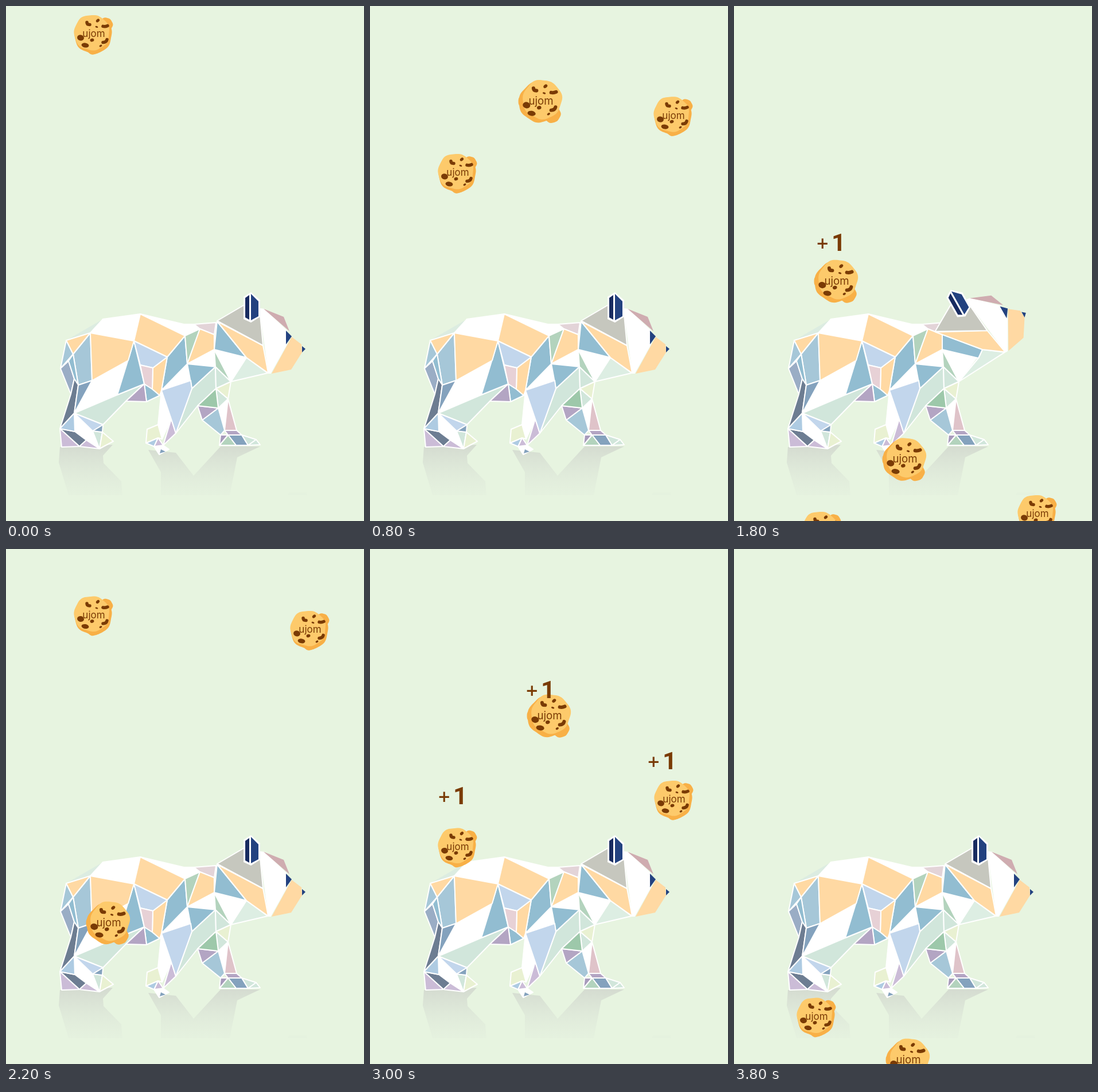
Animation of 624 by 898 pixels, one loop 4 s. Source, as an HTML page with a canvas:

```html
<!DOCTYPE html>
<html lang="en">
<head>
<meta charset="utf-8">
<title>Cookie bear</title>
<style>
html, body { margin: 0; width: 100%; height: 100%; overflow: hidden; background: #e7f4e0; }
canvas { display: block; }
</style>
</head>
<body>
<canvas id="stage" width="624" height="898"></canvas>
<script>
const ctx = document.getElementById('stage').getContext('2d');
const LOOP = 4000, STEP = 200, FAST = 144;
const BROWN = '#7a3b05', ORANGE = '#ffd9a3', BLUE = '#92bdd1', SKY = '#a6c7d8', PERI = '#c2d6ec',
  MINT = '#d1e6db', GREEN = '#b3d3bd', PURPLE = '#b3a5c3', LILAC = '#cbbcd7', SLATE = '#6d7d92',
  STEEL = '#84a2bd', LEMON = '#e9f1d2', WHITE = '#fff', NAVY = '#234280';

// Corners shared by the facets of the body
const hind = {
  a: [105, 583], b: [147, 570], c: [169, 546], d: [234, 537], e: [223, 584], f: [117, 607], g: [95, 632],
  h: [109, 619], i: [119, 650], j: [113, 677], k: [126, 661], l: [150, 653], m: [213, 618], n: [194, 678],
  o: [119, 710], p: [241, 659], q: [209, 689], r: [169, 730], s: [94, 737], t: [120, 742], u: [151, 741],
  v: [140, 757], w: [128, 768], x: [97, 769], y: [163, 772], z: [187, 759], Z: [168, 743]
};
const torso = {
  A: [312, 575], B: [281, 612], C: [256, 631], D: [234, 626], E: [255, 668], F: [245, 690], G: [268, 679],
  H: [271, 670], I: [316, 624], J: [338, 563], K: [363, 573], L: [363, 599], M: [365, 629], N: [324, 667],
  O: [322, 653], Q: [296, 745], R: [288, 720], S: [392, 655], T: [366, 667], V: [310, 555], W: [328, 555]
};
const legs = {
  0: [265, 730], 1: [272, 755], 2: [274, 766], 3: [265, 753], 4: [244, 762], 5: [246, 738], 6: [258, 768],
  7: [284, 773], 8: [267, 782], 9: [387, 685], X: [370, 701], Y: [334, 697], U: [342, 722], P: [381, 740],
  α: [374, 748], β: [402, 740], δ: [387, 748], ε: [411, 748], ζ: [372, 766], η: [401, 766], θ: [422, 766],
  ι: [436, 756], κ: [443, 765]
};
const mesh = { ...hind, ...torso, ...legs };

// Each cookie is at height y at step `turn`, moving at v1 before it and v2 after;
// its "+1" starts at step `bonus`, dx from the centre.
const cookies = [
  { x: 152, enter: 0, leave: 9, turn: 5.15, y: 361, v1: 60.5, v2: FAST, bonus: 5, dx: -50 },
  { x: 297, enter: 1, leave: 10, turn: 5.1, y: 229, v1: 57, v2: FAST, bonus: 6.5, dx: -55, big: true },
  { x: 528, enter: 2, leave: 9, turn: 4.4, y: 224, v1: 81, v2: FAST, bonus: 6.5, dx: -11 },
  { x: 178, enter: 6, leave: 13, turn: 9, y: 480, v1: FAST, v2: 86, bonus: 8, dx: -28, big: true },
  { x: 529, enter: 10, leave: 18, turn: 15.4, y: 467, v1: 74, v2: FAST, bonus: 14, dx: -39 },
  { x: 152, enter: 11, leave: 19, turn: 15, y: 520, v1: 101, v2: 74, bonus: 13, dx: -23 },
  { x: 312, enter: 12, leave: 19, turn: 15, y: 291, v1: 71, v2: 150, bonus: 15, dx: -38, big: true }
];

const height = (c, n) => c.y + (n - c.turn) * (n < c.turn ? c.v1 : c.v2);

function flat(color, ...pts) {
  ctx.beginPath();
  for (let i = 0; i < pts.length; i += 2) ctx.lineTo(pts[i], pts[i + 1]);
  ctx.closePath();
  ctx.fillStyle = color;
  ctx.fill();
}

function edged(color, ...pts) {
  flat(color, ...pts);
  ctx.strokeStyle = WHITE;
  ctx.lineWidth = 2;
  ctx.lineJoin = 'round';
  ctx.stroke();
}

const corners = names => [...names].flatMap(k => mesh[k]);
const facets = (color, ...list) => list.forEach(names => edged(color, ...corners(names)));

function drawReflection() {
  const g = ctx.createLinearGradient(0, 768, 0, 853);
  g.addColorStop(0, 'rgba(200,203,198,.6)');
  g.addColorStop(1, 'rgba(222,232,218,.2)');
  flat(g, 94, 769, 186, 765, 169, 784, 170, 797, 201, 829, 203, 853, 109, 853, 92, 796);
  flat(g, 248, 774, 296, 779, 327, 819, 374, 768, 443, 768, 403, 787, 390, 853, 270, 853, 270, 813);
  flat('rgba(215,225,212,.15)', 494, 848, 523, 848, 525, 853, 491, 853);
}

function drawBody() {
  flat('#dcece1', ...corners('abc'));
  facets(WHITE, 'bcde', 'lmno', 'dVWJA', 'IOH', 'LMI', 'HR10', 'X9P', 'ouvt', 'uyv', '6278');
  facets(MINT, 'onpqr', 'NMTYQ', 'MST', 'T9X', 'uZy');
  facets(SKY, 'afg', 'fblk', 'XPαU');
  facets('#9aadc5', 'ghij');
  facets(BLUE, 'fhik', 'epn', 'pEGF', 'AIHB', 'IMN');
  facets(ORANGE, 'abf', 'belm'.replace('l', '').replace('m', 'ml'), 'dABe', 'CBHGE');
  facets(SLATE, 'ikosj', 'stvw');
  facets(STEEL, 'klo', 'urZ', 'δεθη');
  facets(LILAC, 'swx', 'vyw', 'RQ2', '326');
  facets('#aecbe2', 'sot', '436');
  facets(PERI, 'oru', 'eBCD', 'HONQR');
  facets(LEMON, 'Zzy', 'TS9', '50134');
  facets('#e7d1d6', 'DCEp');
  facets(PURPLE, 'pFq', 'YXU', 'Pβεδ');
  facets(GREEN, 'AJI', 'LSM', 'ζδη');
  facets('#9dc8aa', 'TXY');
  facets('#dfc3c9', '9βP');
  facets('#a79bbb', 'αδζ');
  facets(MINT, 'ειθ', 'ικθ');
  flat(STEEL, 270, 773, 278, 777, 268, 780);
}

function headMap(k) {
  const a = -29.3 * k * Math.PI / 180, c = Math.cos(a), s = Math.sin(a);
  const px = 397, py = 579;
  return (...p) => p.map((v, i) => i % 2
    ? py + .5 * k + (p[i - 1] - px) * s + (v - py) * c
    : px - 6.5 * k + (v - px) * c - (p[i + 1] - py) * s);
}

function drawHead(k) {
  const turn = headMap(k);
  const part = (color, ...p) => edged(color, ...turn(...p));
  const bare = (color, ...p) => flat(color, ...turn(...p));
  const fold = [419 + 7 * k, 613 + k], throat = [419 + 14 * k, 613 - 14 * k];

  edged('#e3d4d8', ...mesh.W, 366, 552, ...mesh.K, ...mesh.J);
  edged('#ddeee3', ...turn(456, 640), ...mesh.S, ...fold, ...throat);
  edged(WHITE, ...mesh.L, ...fold, ...throat, ...mesh.S);
  edged(BLUE, ...turn(368, 550), ...throat, ...fold, ...mesh.L);
  facets(ORANGE, 'JKLI');

  edged(ORANGE, ...turn(368, 550, 448, 592, 457, 640), ...throat);
  part('#c6c7be', 368, 549, 414, 522, 442, 528, 448, 592);
  part(WHITE, 443, 528, 450, 529, 489, 566, 489, 590, 461, 640, 458, 640);
  bare('#cfacb0', 449, 528, 484, 542, 494, 567);
  bare(NAVY, 488, 566, 498, 576, 488, 590);
  bare(ORANGE, 498, 577, 515, 590, 516, 604, 497, 634, 463, 641);
  bare(NAVY, 516, 593, 522, 598, 516, 604);

  bare(WHITE, 414, 507, 427, 499, 443, 513, 443, 542, 427, 552, 414, 546);
  bare('#182b60', 417, 509, 424, 504, 424, 547, 417, 543);
  bare(NAVY, 427, 502, 440, 515, 440, 541, 427, 548);
}

// Wavy disc
function blob(color, x, y, r, phase) {
  ctx.beginPath();
  for (let a = 0; a < 6.28; a += .08) {
    const q = r * (1 + .02 * Math.cos(7 * a + phase) + .015 * Math.cos(4 * a + phase));
    ctx.lineTo(x + q * Math.cos(a), y + q * Math.sin(a));
  }
  ctx.fillStyle = color;
  ctx.fill();
}

function chip(x, y, rx, ry, tilt) {
  ctx.beginPath();
  ctx.ellipse(x, y, rx, ry, tilt, 0, 7);
  ctx.fillStyle = BROWN;
  ctx.fill();
}

function bean(x, y, cx, cy, x2, y2) {
  ctx.beginPath();
  ctx.moveTo(x, y);
  ctx.quadraticCurveTo(cx, cy, x2, y2);
  ctx.strokeStyle = BROWN;
  ctx.lineWidth = 5.5;
  ctx.lineCap = 'round';
  ctx.stroke();
}

function drawCookie(x, y, big) {
  const dark = '#f8b047', light = '#fdca6b';
  ctx.save();
  ctx.translate(x, y);
  if (big) {
    ctx.scale(1.1, 1.1);
    blob(dark, -2, 1, 32, .6);
    blob(dark, -22, 0, 13, 0);
    blob(dark, 18, 20, 14, 0);
    blob(light, 3, -3, 31, 1.2);
  } else {
    blob(dark, 0, 1, 32.5, 2);
    blob(dark, 22, -17, 12, 0);
    blob(dark, 0, 21, 14, 0);
    blob(light, -2.5, -3, 31, 2.6);
  }
  bean(-11, -21, -11, -17, -6, -17);
  bean(17, -14, 21, -13, 25, -15);
  bean(24, 9, 23, 14, 17, 14);
  chip(8, -24, 3.5, 2.5, -.7);
  chip(6, -13, 2.5, 1.4, .3);
  chip(-22, 6, 6, 5, .2);
  chip(-14, 19, 6.5, 4, .15);
  chip(-2, 10, 3.5, 2.8, -.3);
  chip(13, 20, 2.6, 1.7, -.5);
  ctx.font = '400 17px Inter, sans-serif';
  ctx.textAlign = 'center';
  ctx.fillText('ujom', 1, 5);
  ctx.restore();
}

function drawPlus(x, top) {
  ctx.fillStyle = BROWN;
  ctx.textAlign = 'left';
  ctx.font = '600 36px "Open Sans", sans-serif';
  ctx.fillText('+', x - 2, top + 31);
  ctx.font = '700 43px Roboto, sans-serif';
  ctx.fillText('1', x + 24, top + 31);
}

function drawCookies(n) {
  const sway = n < 16 ? 0 : -9;
  const live = cookies.filter(c => n >= c.enter && n <= c.leave);
  for (const c of live) drawCookie(c.x + sway, height(c, n), c.big);
  for (const c of live) {
    const age = n - c.bonus;
    if (age >= 0 && age < 2.4) drawPlus(c.x + sway + c.dx - 4 * age, height(c, n) - 62 - 22 * age);
  }
}

// Lift of the head, 0 to 1, around the two bites
const bite = (d, hold) => Math.max(0, Math.min(1, hold - .55 * Math.abs(d)));
const lift = n => Math.max(bite(n - 8, 1.55), bite(n - 17, 1));

function draw(now) {
  const n = Math.floor(now % LOOP / STEP);
  ctx.fillStyle = '#e7f4e0';
  ctx.fillRect(0, 0, 624, 898);
  drawReflection();
  drawBody();
  drawHead(lift(n));
  drawCookies(n);
}

const began = performance.now();
function tick() {
  draw(performance.now() - began);
  requestAnimationFrame(tick);
}
tick();
</script>
</body>
</html>
```
